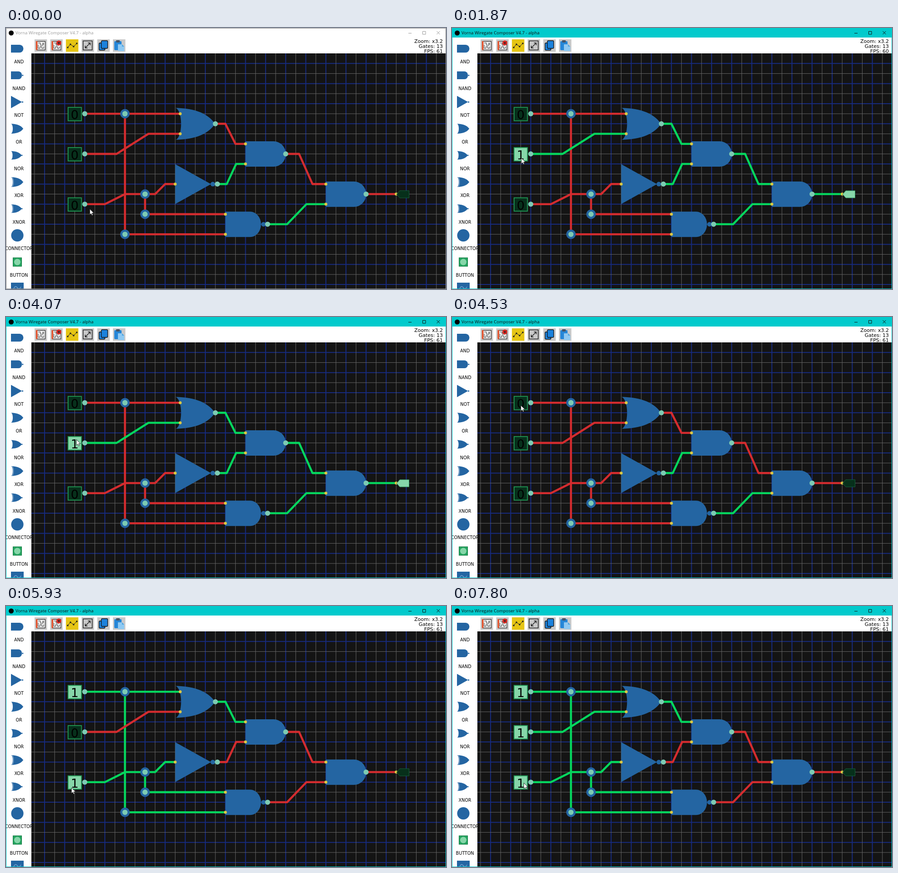
Recreate the animation shown at these times as an HTML page. Size 971 by 576 pixels, loop 8 s.

```html
<!DOCTYPE html>
<html lang="en">
<head>
<meta charset="utf-8">
<title>Circuit board</title>
<style>
  html, body { margin: 0; width: 100%; height: 100%; overflow: hidden; background: #fff; }
  svg { display: block; width: 100%; height: 100%; }
  text { font-family: "DejaVu Sans", sans-serif; }
  .gate { fill: #2465a2; }
  .wire { fill: none; stroke-width: 4.6; stroke-linejoin: round; }
  .label { font-size: 9.6px; text-anchor: middle; }
  .info { font-size: 11px; text-anchor: end; }
  .digit { font-size: 27px; text-anchor: middle; }
  .line { fill: none; stroke: #222; }
</style>
</head>
<body>
<svg viewBox="0 0 971 576">
  <defs>
    <path id="and" d="M0-28H62A27 28 0 0 1 62 28H0Z"/>
    <g id="nand"><path d="M0-28H54.5A24 28 0 0 1 54.5 28H0Z"/><circle cx="84" r="5"/></g>
    <g id="not"><path d="M0-44L79 0L0 44Z"/><circle cx="83" r="5"/></g>
    <path id="or" d="M0-35C34-35 70-27 88 0C70 27 34 35 0 35A13 35 0 0 0 0-35Z"/>
    <g id="nor"><use href="#or"/><circle cx="90" r="5"/></g>
    <g id="xor"><use href="#or"/><path d="M5-35A13 35 0 0 1 5 35" fill="none" stroke="#fff" stroke-width="2"/></g>
    <g id="xnor"><use href="#xor"/><circle cx="90" r="5"/></g>
    <g id="sheet">
      <rect x="4.5" y="4.5" width="19" height="19" fill="#eee" stroke="#222" stroke-width="1.2"/>
      <path class="line" stroke-width=".9" d="M8 8h5v5h6V7M8 12v8h4v-4h4v4h4v-4M17 10h4"/>
      <path d="M3 4h3.500v18l-1.700 3-1.800-3z" fill="#e2512b"/>
    </g>
  </defs>

  <rect width="971" height="576" fill="#fff"/>
  <rect id="bar" width="971" height="21"/>
  <circle cx="11.5" cy="11" r="5.5" fill="#000"/>
  <text id="caption" x="21" y="14" style="font:9.6px 'Open Sans',sans-serif">Vorna Wiregate Composer V4.7 - alpha</text>
  <path id="controls" fill="none" d="M888 11.5h7M919.5 7.5h6.5v6.5h-6.5zM950.5 7l7 7M957.5 7l-7 7"/>

  <g id="tools"></g>
  <g id="side"></g>
  <text class="info" x="964" y="33">Zoom: x3.2</text>
  <text class="info" x="964" y="44">Gates: 13</text>
  <text class="info" id="fps" x="964" y="54.5"></text>

  <rect x="56" y="56" width="914" height="519" fill="#141414"/>
  <path id="blue" stroke="#172b80" stroke-width="2"/>
  <path id="gray" stroke="#666" stroke-width="1"/>
  <g id="wires"></g>
  <g id="gates" class="gate"></g>
  <g id="buttons"></g>
  <g id="pins"></g>
  <path id="lamp" d="M862 367L869 359H889.5V375H869Z"/>
  <g id="press">
    <circle id="anchor" r="5.5" fill="#5e1f23"/>
    <rect x="56" y="533" width="914" height="42" fill="#961828" fill-opacity=".5"/>
    <path fill="none" stroke="#2c0a10" stroke-width="1.5" d="M492 541h29M501 541v-4h11v4M495 541l2 32h19l2-32M501 546l1 23M506.5 546v23M512 546l-1 23"/>
  </g>
  <path id="frame" fill="none" d="M.5.5H970.5V575.5H.5Z"/>
  <path id="cursor" fill="#fff" stroke="#111" stroke-width=".8" d="M0 0V12.5L2.9 9.9L4.8 14.2L6.8 13.3L4.9 9.1H8.9Z"/>
</svg>

<script>
const $ = id => document.getElementById(id);
const set = (el, attrs) => { for (const k in attrs) el.setAttribute(k, attrs[k]); return el; };
const add = (parent, tag, attrs) =>
  $(parent).appendChild(set(document.createElementNS('http://www.w3.org/2000/svg', tag), attrs));

const PITCH = 22.17, LOOP = 8000, CLICK = 135;
const gx = k => 129.5 + k * PITCH, gy = k => 189.2 + k * PITCH;
const MINT = '#7dcbb3', LIT = '#86d6a9', DARK = '#07301b', BLUE = '#2465a2';

// Board grid: blue and gray lines take turns
let blue = '', gray = '';
for (let k = -5; k < 38; k++) {
  const col = k > -4 ? `M${gx(k)} 56V575` : '', row = k < 18 ? `M56 ${gy(k)}H970` : '';
  if (k % 2) { gray += col; blue += row; } else { blue += col; gray += row; }
}
set($('blue'), { d: blue });
set($('gray'), { d: gray });

// Signal, then output pin and input pin in grid units
const wires = [
  ['a', 2, 0, 6, 0], ['a', 6, 0, 11.5, 0], ['a', 6, 0, 6, 12], ['a', 6, 12, 16, 12],
  ['b', 2, 4, 11.5, 2],
  ['c', 2, 9, 8, 8], ['c', 8, 8, 11, 7], ['c', 8, 8, 8, 10], ['c', 8, 10, 16, 10],
  ['or', 15, 1, 18, 3], ['not', 15.2, 7, 18, 5], ['and', 22, 4, 26, 7],
  ['nand', 20.2, 11, 26, 9], ['out', 30, 8, 33, 8]
].map(([net, x0, y0, x1, y1]) => {
  const third = (x1 - x0) / 3, dot = (x, y, r, fill) => add('pins', 'circle', { cx: gx(x), cy: gy(y), r, fill });
  dot(x0, y0, 5.6, MINT);
  // A wire that ends on a whole column left of the gates meets a connector
  if (x1 === 6 || x1 === 8) {
    dot(x1, y1, 10.5, BLUE);
    dot(x1, y1, 5.6, MINT);
  } else dot(x1, y1, 3.2, '#dac843');
  // Level, slanted, level: a third of the way each
  const points = [[x0, y0], [x0 + third, y0], [x1 - third, y1], [x1, y1]].map(([x, y]) => [gx(x), gy(y)]).join(' ');
  return { net, el: add('wires', 'polyline', { class: 'wire', points }) };
});

for (const [kind, x, y] of [['or', 11, 1], ['not', 11, 7], ['and', 18, 4], ['nand', 16, 11], ['and', 26, 8]])
  add('gates', 'use', { href: '#' + kind, x: gx(x), y: gy(y) + .2 });

const rows = { a: 0, b: 4, c: 9 }, buttons = {};
for (const n in rows) {
  const y = gy(rows[n]);
  buttons[n] = {
    box: add('buttons', 'rect', { x: 137, y: y - 14, width: 29.5, height: 29.5, stroke: '#1f9a55', 'stroke-width': 1.8 }),
    digit: add('buttons', 'text', { class: 'digit', x: 151.5, y: y + 12 })
  };
}

// Side palette
const kinds = ['AND', 'NAND', 'NOT', 'OR', 'NOR', 'XOR', 'XNOR', 'CONNECTOR', 'BUTTON'];
kinds.forEach((name, i) => {
  const y = 45.6 + i * 58.87, scale = /NOR/.test(name) ? .27 : .308;
  if (i < 7) add('side', 'use', { href: '#' + name.toLowerCase(), class: 'gate', transform: `translate(11 ${y}) scale(${scale})` });
  add('side', 'text', { class: 'label', x: 28.5, y: y + 32.7 }).textContent = name;
});
add('side', 'circle', { class: 'gate', cx: 25, cy: 457.7, r: 13.6 });
add('side', 'rect', { x: 15.5, y: 507, width: 19, height: 19, fill: '#24a45f', stroke: '#137741' });
add('side', 'circle', { cx: 25, cy: 516.5, r: 7, fill: LIT });
add('side', 'rect', { class: 'gate', x: 11, y: 562, width: 28, height: 13 });
add('side', 'path', { d: 'M17 575q4-8 8-2t8-2', fill: 'none', stroke: '#6fa3cf', 'stroke-width': 1.5 });

// Toolbar
const icons = [
  '<use href="#sheet"/>',
  '<use href="#sheet"/><circle cx="19" cy="8" r="5.5" fill="#dd2a24"/><path d="M17 6l4 4M21 6l-4 4" stroke="#222" stroke-width="1.3"/>',
  '<path class="line" d="M4 18L10 11L17 16L24 9"/><path d="M4 18h0M10 11h0M17 16h0M24 9h0" stroke="#222" stroke-width="3.5" stroke-linecap="round"/>',
  '<path class="line" stroke-width="1.5" d="M3.5 3.5h20v20h-20zM8 19L19 8M14 8h5v5M8 14v5h5"/>',
  '<g fill="#1c82dc" stroke="#111" stroke-width="1.3"><rect x="4" y="8" width="13" height="16" rx="2"/><rect x="9" y="3" width="14" height="17" rx="2"/></g>',
  '<rect x="3" y="4" width="16" height="20" rx="2" fill="#2687d8"/><rect x="7" y="2" width="8" height="5" rx="1" fill="#45566a"/><path d="M11 11h9l5 5v10H11z" fill="#8fc9f2"/><path d="M20 11v5h5z" fill="#4fa4df"/>'
];
icons.forEach((art, i) => {
  const g = add('tools', 'g', { transform: `translate(${63 + i * 34.6} 25)` });
  g.innerHTML = `<rect width="27.5" height="27.5" fill="${i === 2 ? '#e6c514' : '#c9c9c9'}"/>` + art;
});

// Each visit: when the pointer sets off and arrives, the button, where it rests, press times
const visits = [
  [70, 330, 'c', 149, 388, 330, 1130],
  [1270, 1670, 'b', 153, 287, 1670],
  [2330, 2800, 'c', 150, 390, 2930, 3730],
  [3870, 4070, 'b', 155.5, 270.5, 4270],
  [4400, 4530, 'a', 152, 195, 4800],
  [4930, 5200, 'c', 144.5, 401, 5670, 6200],
  [6330, 6670, 'b', 151.5, 281, 6740],
  [7130, 7330, 'c', 158.5, 390.5, 7470]
];

function draw(t) {
  const v = { a: 0, b: 0, c: 0 };
  let held = null, px = 185, py = 399.5;
  for (const [leave, arrive, n, x, y, ...presses] of visits) {
    if (t < leave) break;
    // Eased move, bowed to the right
    const u = Math.min(1, (t - leave) / (arrive - leave)), ease = u * u * (3 - 2 * u);
    const bow = .12 * Math.hypot(x - px, y - py) * Math.sin(Math.PI * ease);
    px += (x - px) * ease + bow;
    py += (y - py) * ease;
    // A button flips on release
    for (const p of presses) {
      if (t >= p + CLICK) v[n] ^= 1;
      else if (t >= p) held = n;
    }
  }
  // The last press before the second visit to the middle button stays hidden until the pointer rests
  v.or = v.a | v.b;
  v.not = 1 - v.c;
  v.and = v.or & v.not;
  v.nand = 1 - (v.a & v.c);
  v.out = v.and & v.nand;

  for (const { net, el } of wires) set(el, { stroke: v[net] ? '#06d65e' : '#d42c2f' });
  for (const n in buttons) {
    set(buttons[n].box, { fill: v[n] ? LIT : DARK });
    buttons[n].digit.textContent = v[n];
  }
  set($('lamp'), { fill: v.out ? LIT : DARK, stroke: v.out ? '#2a8a58' : '#14603a' });
  set($('press'), { visibility: held ? 'visible' : 'hidden' });
  if (held) set($('anchor'), { cx: gx(0), cy: gy(rows[held] - 1) });

  const active = t >= 330, ink = active ? '#111' : '#999';
  set($('bar'), { fill: active ? '#02cacc' : '#fff' });
  set($('frame'), { stroke: active ? '#02cacc' : '#8a8a8a' });
  set($('caption'), { fill: ink });
  set($('controls'), { stroke: ink });
  const slow = (t >= 900 && t < 1930) || (t >= 5330 && t < 5900);
  $('fps').textContent = 'FPS: ' + (slow ? 60 : 61);
  set($('cursor'), { transform: `translate(${px} ${py})` });
}

const start = performance.now();
function tick() {
  draw((performance.now() - start) % LOOP);
  requestAnimationFrame(tick);
}
tick();
</script>
</body>
</html>
```
